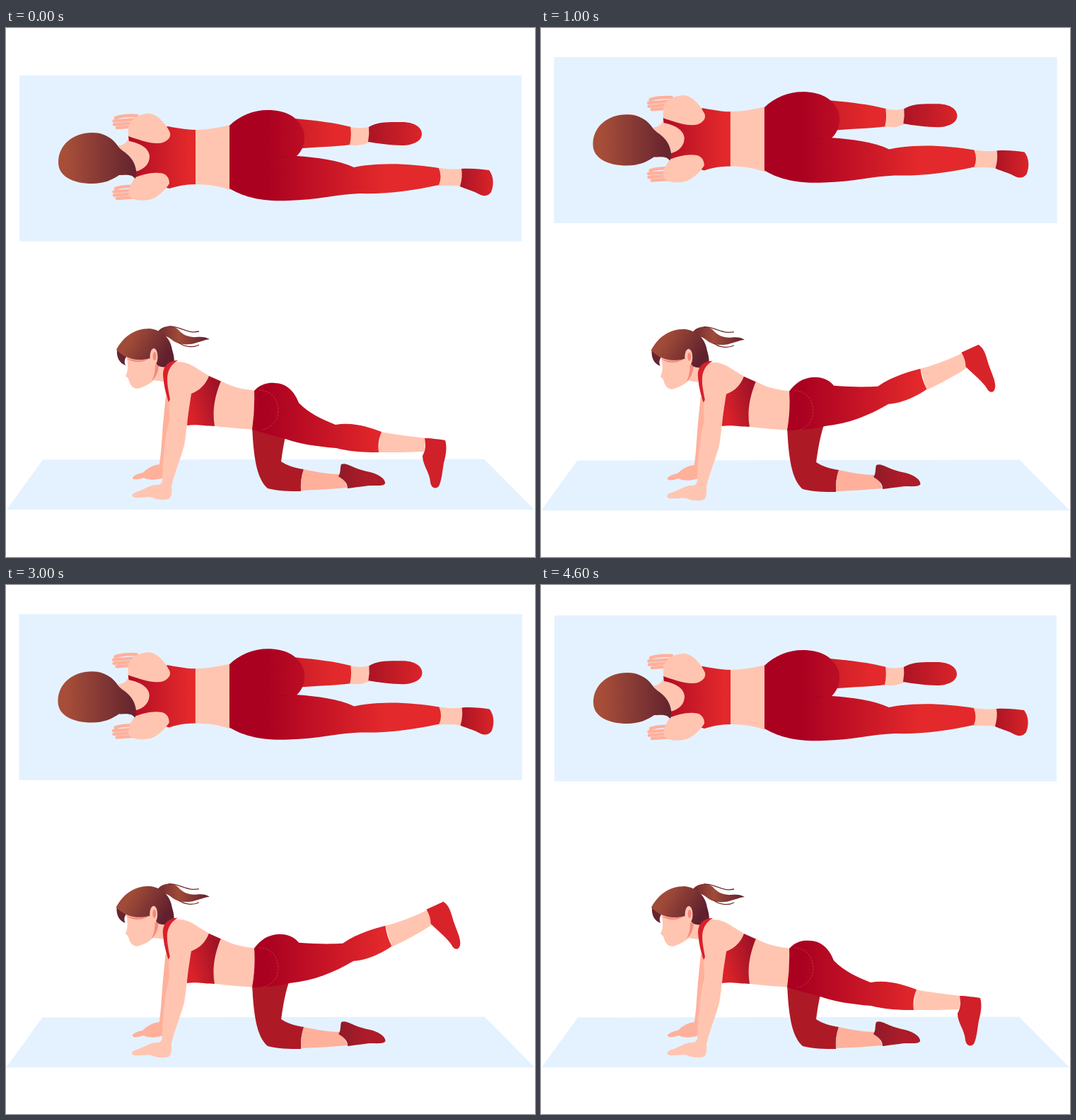
Animation of 748 by 748 pixels, one loop 5000 ms. Source, as an HTML page:

```html
<!DOCTYPE html>
<html lang="en">
<head>
<meta charset="utf-8">
<title>Leg raise exercise</title>
<style>
html, body { margin: 0; width: 100%; height: 100%; overflow: hidden; background: #fff; }
svg { display: block; width: 100%; height: 100%; }
.mat { fill: #e4f2ff; }
.skin { fill: #ffc5b1; }
.shade { fill: #ffb09b; }
.far { fill: #ad1a26; }
.fingers { fill: none; stroke: #ffb09b; stroke-width: 4.600; stroke-linecap: round; }
</style>
</head>
<body>
<svg viewBox="0 0 748 748">
  <defs>
    <linearGradient id="hairTop"><stop offset=".1" stop-color="#a74e39"/><stop offset=".95" stop-color="#66252f"/></linearGradient>
    <linearGradient id="hairSide" x1="0" y1=".3" x2="1" y2=".7"><stop offset=".2" stop-color="#a04b38"/><stop offset=".9" stop-color="#60202e"/></linearGradient>
    <linearGradient id="tail"><stop stop-color="#70292f"/><stop offset=".4" stop-color="#a04b38"/><stop offset="1" stop-color="#60202e"/></linearGradient>
    <linearGradient id="bra"><stop stop-color="#b00c24"/><stop offset=".9" stop-color="#e3292b"/></linearGradient>
    <linearGradient id="braSide" x1="0" y1=".7" x2="1" y2=".3"><stop offset=".1" stop-color="#d9222a"/><stop offset=".9" stop-color="#a01227"/></linearGradient>
    <linearGradient id="pants" gradientUnits="userSpaceOnUse" x1="370" y1="0" x2="535" y2="0"><stop stop-color="#ab0121"/><stop offset="1" stop-color="#e3292b"/></linearGradient>
    <linearGradient id="farLeg"><stop stop-color="#cc1d28"/><stop offset=".7" stop-color="#e3292b"/></linearGradient>
    <linearGradient id="shoe"><stop stop-color="#ab1424"/><stop offset="1" stop-color="#da242a"/></linearGradient>
    <linearGradient id="farShoe"><stop stop-color="#8f1a29"/><stop offset=".6" stop-color="#ad1c28"/></linearGradient>
  </defs>

  <g id="above">
    <path class="mat" d="M19 67H729V301.500H19Z"/>
    <path id="fingers" class="fingers" d="M155 127Q168 123 185 124M152.500 131.500L185 129M153 136.500L185 134M157 141L185 139"/>
    <use href="#fingers" y="100"/>
    <path class="skin" d="M122 149Q133 144 140 156Z"/>
    <path class="skin" d="M156 167C166 166 173 162 173 154L205 162L206 184L198 202L184 212Z"/>
    <path fill="url(#bra)" d="M173 153L229 139C245 142 256 144 269 144V221C255 221 243 223 231 227L182 212L183 203C196 200 203 192 203 181C202 170 190 163 174 160Z"/>
    <path class="skin" d="M203 121C190 121 176 127 173 140V153C185 157 208 166 222 162C232 158 234 151 231 146C226 136 215 122 203 121Z"/>
    <path class="skin" d="M183 211C175 221 172 231 174 237C180 245 195 245 206 242C216 238 226 228 231 220C231 211 226 205 216 205C205 204 192 208 183 211Z"/>
    <path class="skin" d="M268 144C285 144 300 141 317 137V229C300 223 285 221 268 221Z"/>
    <path fill="url(#hairTop)" d="M74 190C74 165 95 148 122 148C140 148 152 157 159 168C165 176 182 180 184.500 204L183 213L178 209C172 207 167 208 160 208C150 215 138 220 122 220C95 220 74 210 74 190Z"/>
    <path fill="url(#farLeg)" d="M408 128C440 131 465 134 488 140Q490 153 487 165C465 168 440 168 408 171Z"/>
    <path class="skin" d="M487 140Q499 143 513 140V162Q499 168 486 165Q489 153 487 140Z"/>
    <path fill="url(#shoe)" d="M513 140C525 132 545 133 560 133C575 133 588 139 588 150C588 160 575 166 560 166C545 166 525 163 512 161Q514 150 513 140Z"/>
    <g id="legStraight">
      <path class="skin" d="M613 198Q628 201 646 199L643 224Q628 222 611 223Z"/>
      <path fill="url(#shoe)" d="M644 199C660 198 672 200 683 201C690 210 690 222 686 232C681 239 674 238 667 234C658 229 650 228 642 224Q646 210 644 199Z"/>
      <path fill="url(#pants)" d="M316 138C330 124 350 116 370 116C395 116 412 125 420 143C426 160 418 175 411 181C440 183 470 187 492 197C530 189 575 192 612 198Q617 211 612 222C575 230 540 235 500 234C470 235 440 243 400 244C360 246 335 238 316 227Z"/>
      <path d="M385 182H397" stroke="#970b22"/>
    </g>
    <g id="legCrossed">
      <path class="skin" d="M600 111Q618 107 632 101L637 124Q620 127 604 135Z"/>
      <path fill="url(#shoe)" d="M628 102C640 98 655 91 668 89C678 92 682 103 679 112C676 121 668 125 661 125C650 123 643 123 636 125Q635 112 628 102Z"/>
      <path fill="url(#pants)" d="M316 138C330 124 350 116 370 116C395 116 412 125 420 143C424 152 423 160 421 165C445 161 470 160 490 154C525 134 560 117 602 112Q609 122 607 134C580 153 540 180 495 190C475 209 435 231 395 243C360 247 335 240 316 227Z"/>
    </g>
  </g>

  <g id="side">
    <path class="mat" d="M52 610.500L676 609.500L747 681H1Z"/>
    <path class="shade" d="M226 520L222 560L219 600L217 617C205 618 198 625 193 629C186 630 178 634 179 637C183 640 190 637 195 636C199 639 212 640 222 636L235 600L240 540Z"/>
    <path class="far" d="M348 560H400C393 582 391 600 389 613C398 619 408 622 421 624Q416 638 417 655C400 655 385 655 370 651C358 640 350 620 348 560Z"/>
    <path class="shade" d="M421 624C440 628 455 631 474 631L483 650C460 652 440 653 417 654Q416 638 421 624Z"/>
    <path fill="url(#farShoe)" d="M474 617C478 615 483 617 487 619C495 623 505 626 515 628C527 631 537 638 536 644C534 648 525 647 515 647C503 648 492 650 483 651C483 645 480 640 470 634C474 628 472 621 474 617Z"/>

    <path class="skin" d="M171 466C173 480 172 487 169 492Q174 496 174 499C176 506 180 510 186 510C195 508 203 503 209 498L222 500L236 478L205 455Z"/>
    <path d="M216 477Q215 492 206 499Q211 490 211 476Z" fill="#f48a7e"/>
    <path d="M168 466Q186 473 203 467Q186 478 168 466Z" fill="#f48a7e"/>
    <path fill="url(#tail)" d="M215 429C222 420 236 420 243 426C249 433 257 438 269 437C277 436 283 437 288 440C280 441 274 444 266 446C254 449 243 447 236 442C230 437 225 434 219 437Z"/>
    <path d="M230 422C246 421 256 433 273 429M244 445C254 452 266 452 273 448" fill="none" stroke="#70292f" stroke-width="1.300"/>
    <path d="M157 455C156 465 160 474 169 477Q166 471 170 465Z" fill="#66252f"/>
    <path fill="url(#hairSide)" d="M156 455C165 438 180 425 203 425C222 427 233 440 235 455C238 465 239 473 236 477C230 481 222 480 216 478L203 467C190 471 176 469 166 463Q160 459 156 455Z"/>
    <ellipse class="skin" cx="209" cy="465" rx="5.500" ry="12"/>
    <ellipse cx="210" cy="464" rx="2.500" ry="6" fill="#f48a7e"/>

    <path class="skin" d="M228 478C240 468 255 472 268 480C278 487 285 490 289 493C282 510 271 515 262 517C257 545 255 575 252 590C246 612 238 630 234 648C235 655 234 664 230 666C222 668 212 667 207 664C200 662 190 665 182 664C176 662 178 658 185 656C195 653 203 646 213 646C217 646 220 645 221 640C222 610 225 575 231 555C231 545 230 535 230 525C226 510 222 492 228 478Z"/>
    <path d="M243 470C230 470 222 478 222 490C223 505 226 518 230 529L232 525C229 510 226 495 230 485C233 477 238 473 243 470Z" fill="#d9202a"/>
    <path fill="url(#braSide)" d="M287 492L305 500C297 515 292 540 296 563C280 563 270 560 256 562C257 548 260 530 262 517C275 512 283 503 287 492Z"/>
    <path class="skin" d="M304 499C320 508 335 511 354 513V568C335 567 315 565 295 563C291 540 296 518 304 499Z"/>

    <g id="legLow">
      <path class="skin" d="M530 571C550 575 570 577 594 580L591 599C570 600 550 600 526 600Z"/>
      <path d="M592 580C603 580 614 582 621 583C624 592 622 605 619 615C617 627 616 640 612 648C607 653 601 650 600 642C599 628 589 618 589 605C593 597 594 590 592 580Z" fill="#d0202a"/>
      <path fill="url(#pants)" d="M351 513C360 503 372 501 380 502C395 502 407 512 414 530C428 545 447 553 466 561C490 557 512 564 531 571Q525 585 527 600C510 600 490 600 467 594C440 592 415 588 395 581C380 577 362 572 348 568Q352 540 351 513Z"/>
    </g>
    <g id="legHigh">
      <path class="skin" d="M536 481C560 475 580 466 597 458L603 479C586 490 568 500 545 511Z"/>
      <path d="M594 458L618 447C627 453 629 464 632 474C637 489 644 501 641 510C639 516 633 515 630 509C624 499 612 490 600 478Q600 468 594 458Z" fill="#d9232a"/>
      <path fill="url(#pants)" d="M351 513C361 499 374 493 387 493C401 493 409 499 414 505C440 507 459 507 476 506C494 493 514 487 536 481Q538 496 545 510C529 521 512 529 491 531C464 547 434 559 401 562C385 566 368 568 348 568Q353 540 351 513Z"/>
    </g>
    <path d="M358 512C375 512 385 525 385 542C384 556 375 566 362 568" fill="none" stroke="#cc3a45" stroke-width=".8" stroke-dasharray="3 1.500"/>
  </g>
</svg>
<script>
const el = id => document.getElementById(id);
const show = (id, on) => el(id).style.display = on ? "" : "none";
const place = (id, x, y, scale) => el(id).setAttribute("transform", `translate(${x} ${y}) scale(${scale})`);

// One pose per second: height of each view, slight zoom, leg states.
const rest = { x: 0, top: 0, bottom: 0, scale: 1 };
const raised = { x: -.7, top: -26, bottom: -.2, scale: 1.002, high: true };
const poses = [rest, raised, { ...rest, crossed: true }, raised, { ...rest, top: -24, bottom: 1 }];

function draw() {
  const pose = poses[Math.floor(performance.now() / 1000) % poses.length];
  place("above", pose.x, pose.top, pose.scale);
  place("side", pose.x, pose.bottom, pose.scale);
  show("legCrossed", pose.crossed);
  show("legStraight", !pose.crossed);
  show("legHigh", pose.high);
  show("legLow", !pose.high);
  requestAnimationFrame(draw);
}
draw();
</script>
</body>
</html>
```
